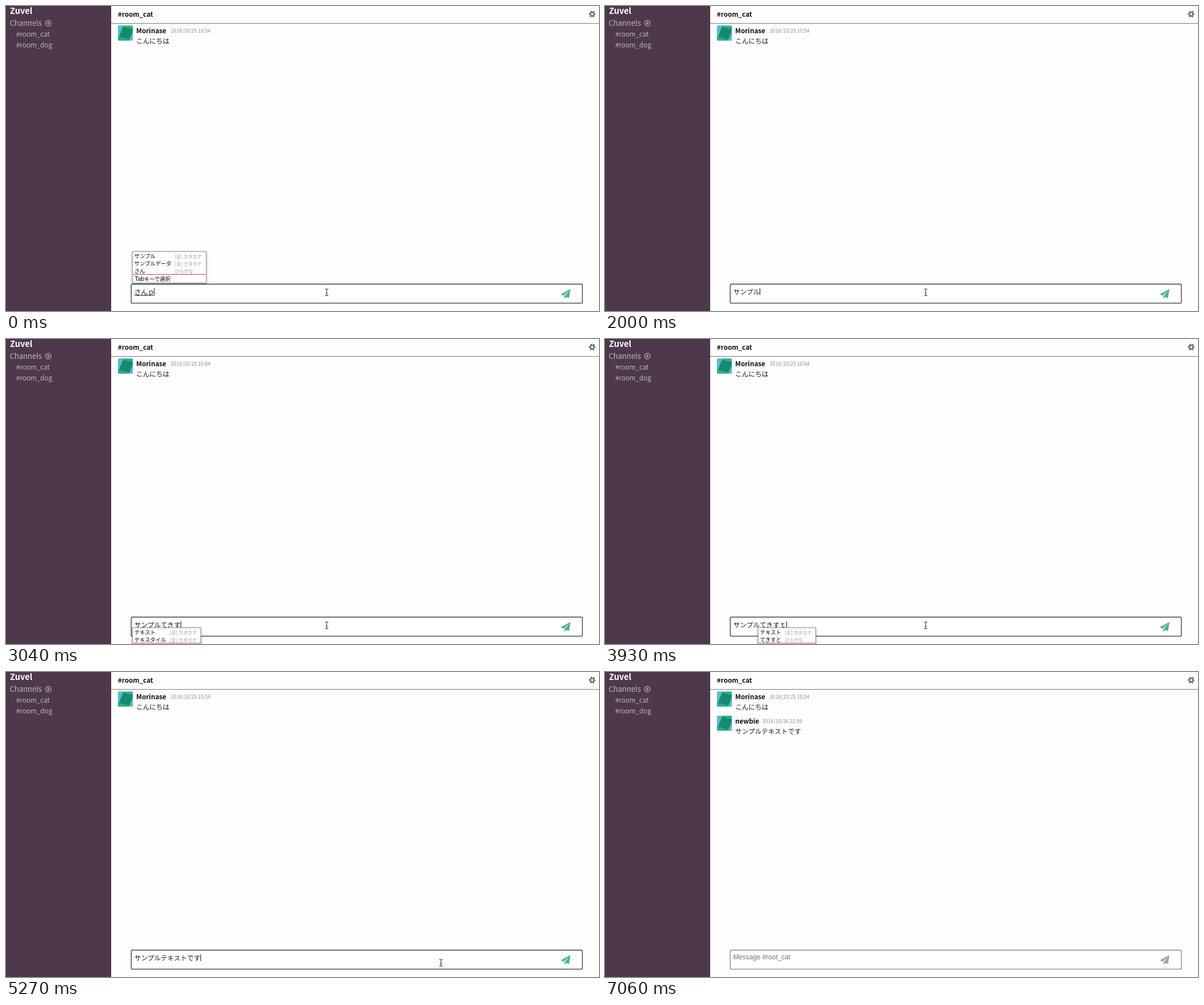
Recreate the animation shown at these times as an HTML page. Size 1043 by 537 pixels, loop 8490 ms.

```html
<!DOCTYPE html>
<html lang="ja">
<head>
<meta charset="utf-8">
<title>Chat room</title>
<style>
html, body { margin: 0; width: 100%; height: 100%; overflow: hidden; background: #fefefe; }
svg { display: block; width: 1043px; height: 537px; font: 11.68px "Noto Sans CJK JP", "Noto Sans CJK", sans-serif; }
text { fill: #1d1d1d; }
.bold { font-weight: 700; fill: #111; }
.side text { fill: #bfb5bd; }
.side .brand { font-size: 14.6px; font-weight: 700; fill: #fff; }
.side .group { font-size: 13.1px; }
.date { font-size: 8.76px; fill: #8a8a8a; }
.hint { font: 11.85px "Liberation Sans", Arial, sans-serif; fill: #757575; }
#popup { filter: drop-shadow(0 1.5px 2px rgba(0, 0, 0, .4)); }
#popup text { font-size: 9.35px; fill: #000; }
#popup .latin { font-family: "Liberation Sans", Arial, sans-serif; font-size: 10.4px; }
#popup .note { font-size: 8.1px; fill: #999; }
#frame { fill: #fff; stroke: #565656; stroke-width: 1.6; }
#plane { fill: #4ab488; }
.blur #frame { stroke: #999; }
.blur #plane { fill: #a3a3a3; }
</style>
</head>
<body>
<svg viewBox="0 0 1043 537">
  <defs>
    <clipPath id="round"><rect width="26.5" height="27" rx="2.5"/></clipPath>
    <g id="avatar" clip-path="url(#round)">
      <rect width="27" height="27" fill="#2fae8b"/>
      <path d="M0 0H9.5L2 20L0 18Z" fill="#5dbccb"/>
      <path d="M27 13V27H18.5Z" fill="#5dbccb"/>
      <path d="M9.5 2.5L26.5 6.5L20.5 25L2 20Z" fill="#148a72"/>
    </g>
  </defs>

  <g class="side">
    <rect width="185" height="537" fill="#4d394b"/>
    <text class="brand" x="7" y="13.8">Zuvel</text>
    <text class="group" x="6.4" y="35">Channels</text>
    <g fill="none" stroke="#c9c0c7" stroke-width="1.1">
      <circle cx="74.5" cy="30.3" r="4.9"/>
      <path d="M71.7 30.3h5.6M74.5 27.5v5.6"/>
    </g>
    <text x="18" y="54">#room_cat</text>
    <text x="18" y="72.6">#room_dog</text>
  </g>

  <text class="bold" x="196.8" y="18.8">#room_cat</text>
  <path d="M185 30.7H1043" stroke="#8c8c8c" stroke-width="1.2"/>
  <g transform="translate(1031 14.3)" fill="none" stroke="#737373">
    <circle r="3.3" stroke-width="2.6"/>
    <circle r="5.1" stroke-width="2" stroke-dasharray="2.7 2.64" stroke-dashoffset="1.35"/>
  </g>

  <use href="#avatar" x="196.7" y="34.2"/>
  <text class="bold" x="229" y="48">Morinase</text>
  <text class="date" x="290" y="47.2">2018/10/25 10:54</text>
  <text x="229" y="66.3">こんにちは</text>

  <g id="reply">
    <use href="#avatar" x="196.7" y="76.7"/>
    <text class="bold" x="229" y="90.5">newbie</text>
    <text class="date" x="277" y="89.7">2018/10/26 22:59</text>
    <text x="229" y="108.7">サンプルテキストです</text>
  </g>

  <g id="box">
    <rect id="frame" x="220.3" y="489.6" width="793.4" height="33.6" rx="2"/>
    <text class="hint" id="hint" x="225.4" y="506">Message #root_cat</text>
    <text id="typed" x="225.8" y="507.7"></text>
    <rect id="under" y="509" height="1" fill="#333"/>
    <rect id="caret" y="497" width="1" height="12" fill="#111"/>
    <path id="plane" d="M992.8 498.2L975.8 507.6L980.8 509.9L990.4 501.3L982.4 511.3V515.6L985.5 512.2L990.2 514.2Z"/>
  </g>
  <g id="popup"></g>

  <g id="cursor">
    <path id="beam" d="M-3 -6Q0 -6 0 -4.5Q0 -6 3 -6M0 -5V5M-3 6Q0 6 0 4.5Q0 6 3 6M-1.5 1.5H1.5" fill="none" stroke="#333" stroke-width="1.1"/>
    <path id="hand" d="M-2.5 -5.5Q-1.4 -6.6 -.6 -5.2L.6 -1.6Q1.5 -2.6 2.4 -1.4Q3.4 -2 4 -.8Q5.2 -1.2 5.4 .4L5.8 3.6L4.8 6.4H-.4L-4.4 1.6Q-4.4 0 -2.8 .6L-1.2 1.8L-2.8 -4Q-3 -5 -2.5 -5.5Z" fill="#fff" stroke="#222"/>
    <path id="arrow" d="M0 0V11.5L2.7 9L4.5 13L6.3 12.2L4.6 8.3H8.2Z" fill="#111" stroke="#fff" stroke-width=".8"/>
  </g>
</svg>
<script>
const LOOP = 8490, EM = 11.68, LEFT = 225.8, ROW = 13;
const $ = id => document.getElementById(id);
const KATA = "[全] カタカナ", HIRA = "ひらがな";

// Suggestion lists: left, top, width, note offset, rows of [word, note]
const list = (x, y, w, noteAt, ...rows) => ({ x, y, w, noteAt, rows });
const guess = word => list(222.5, 508.5, 95, 48.5, ["→ sanpn", "もしかして"], [word]);
const lists = {
  san: list(222.5, 432.5, 129.5, 74.5, ["サンプル", KATA], ["サンプルデータ", KATA], ["さん", HIRA]),
  pn: guess("さんpn"),
  pnr: guess("さんpんr"),
  pnru: guess("さんpんる"),
  te: list(222.5, 432.5, 101, 46.5, ["手"], ["テキスト", KATA], ["テスト", KATA]),
  teki: list(222.5, 508.5, 120, 65.5, ["テキスト", KATA], ["テキスタイル", KATA]),
  text: list(269.5, 508.5, 101, 46.5, ["テキスト", KATA], ["てきすと", HIRA]),
  de: list(269.5, 434.5, 85, 0, ["ですが、"], ["でしょうか?"], ["です。"]),
  desu: list(269.5, 434.5, 85, 0, ["です。"], ["ですが、"], ["ですか?"])
};

// [start, settled text, text being composed, suggestion list]
const typing = [
  [0, "", "さんｐ", "san"],
  [450, "", "さんｐｎ", "pn"],
  [800, "", "さんｐんｒ", "pnr"],
  [950, "", "さんｐんる", "pnru"],
  [1250, "", "さんｐｎ", "pn"],
  [1400, "", "さんｐ", "san"],
  [1550, "", "さんぷ", "san"],
  [2000, "サンプル", ""],
  [2450, "サンプル", "て", "te"],
  [2600, "サンプル", "てｋ", "te"],
  [2750, "サンプル", "てき", "te"],
  [2900, "サンプル", "てきｓ", "teki"],
  [3040, "サンプル", "てきす", "teki"],
  [3790, "サンプル", "てきすｔ", "text"],
  [3940, "サンプル", "てきすと", "text"],
  [4090, "サンプル", "テキスト", "text"],
  [4240, "サンプルテキスト", ""],
  [4380, "サンプルテキスト", "ｄ", "de"],
  [4530, "サンプルテキスト", "で", "de"],
  [4680, "サンプルテキスト", "です", "desu"],
  [4820, "サンプルテキストです", ""],
  [6160, "", ""]
];

// [start, shape, x, y]
const pointer = [
  [0, "beam", 564, 504],
  [5120, "beam", 604, 506],
  [5270, "beam", 765, 512],
  [5420, "beam", 915, 516],
  [5570, "hand", 987, 522],
  [5720, "hand", 988, 516.5],
  [6910, "arrow", 1007, 525],
  [7060, "", 0, 0]
];

const at = (steps, t) => steps.findLast(s => s[0] <= t);
const show = (id, on) => $(id).setAttribute("visibility", on ? "visible" : "hidden");
const set = (id, name, value) => $(id).setAttribute(name, value);
const label = (x, y, s, cls = "") => `<text class="${cls}" x="${x}" y="${y}">` +
  s.replace(/[A-Za-z?]+/g, m => `<tspan class="latin">${m}</tspan>`) + "</text>";

function popupMarkup({ x, y, w, noteAt, rows }) {
  const line = y + rows.length * ROW + 1.5;
  const words = rows.map(([word, note], i) => {
    const base = y + 11.3 + i * ROW;
    return label(x + 3.3, base, word) + (note ? label(x + noteAt, base, note, "note") : "");
  });
  return `<rect x="${x}" y="${y}" width="${w}" height="${line - y + 14.5}" fill="#fff" stroke="#999"/>` +
    `<path d="M${x + .5} ${line - .5}h${w - 1}" stroke="#b5484c"/>` +
    words.join("") + label(x + 3.8, line + 11.3, "Tabキーで選択");
}

let shown;
function draw(now) {
  const t = now % LOOP;
  const [, done, fresh, name] = at(typing, t);
  const [, shape, px, py] = at(pointer, t);
  const start = LEFT + done.length * EM, end = start + fresh.length * EM;
  const focused = t < 5860;

  $("typed").textContent = done + fresh;
  set("under", "x", start);
  set("under", "width", end - start);
  set("caret", "x", Math.floor(end));
  show("caret", focused && !(t >= 3490 && t < 3790));
  show("hint", t >= 6160);
  show("reply", t >= 6310);
  $("box").classList.toggle("blur", !focused);

  if (name !== shown) {
    $("popup").innerHTML = name ? popupMarkup(lists[name]) : "";
    shown = name;
  }
  for (const id of ["beam", "hand", "arrow"]) show(id, id === shape);
  set("cursor", "transform", `translate(${px} ${py})`);
}

const origin = performance.now();
function tick() {
  draw(performance.now() - origin);
  requestAnimationFrame(tick);
}
tick();
</script>
</body>
</html>
```
